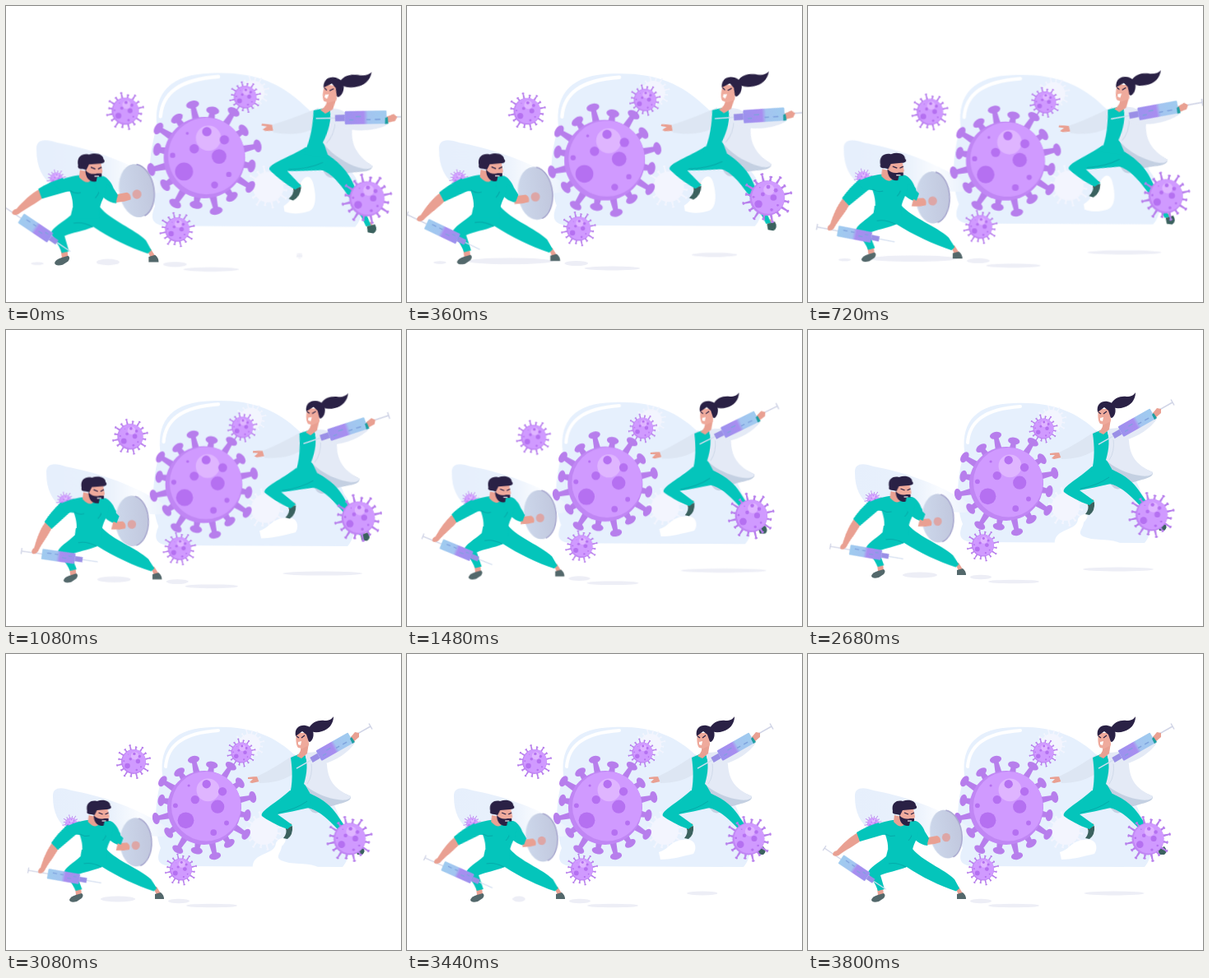
Write an HTML page that moves like this. It is 480 by 360 pixels and loops after 3840 ms.

```html
<!DOCTYPE html>
<html lang="en">
<head>
<meta charset="utf-8">
<title>Doctors fighting a virus</title>
<style>
html, body { margin: 0; width: 100%; height: 100%; overflow: hidden; background: #fff; }
svg { display: block; width: 480px; height: 360px; }

/* one-shot moves that restart with every loop */
.cam, .settle, .drift, .leap, .reach, .tail { animation: 3840ms infinite; }
.cam { animation-name: cam; transform-origin: 257px 163px; }
.settle { animation-name: settle; }
.drift { animation-name: drift; }
.leap { animation-name: leap; transform-origin: 343px 217px; }
.reach { animation-name: reach; transform-origin: 368px 127px; }
.tail { animation-name: tail; transform-origin: 370px 91px; }
@keyframes cam { 0% { transform: scale(1.1); animation-timing-function: cubic-bezier(.333,0,.667,1); } 49.5%, 100% { transform: none; } }
@keyframes settle { 0% { transform: translate(1.5px,-4.5px); animation-timing-function: ease-out; } 20%, 100% { transform: none; } }
@keyframes drift { 0% { transform: translate(9px,3px); animation-timing-function: cubic-bezier(.333,0,.667,1); } 49.5%, 100% { transform: none; } }
@keyframes leap { 0% { transform: translateY(5px) rotate(10.5deg) scale(1.03); animation-timing-function: cubic-bezier(.333,0,.667,1); } 49.5%, 100% { transform: none; } }
@keyframes reach { 0% { transform: rotate(18deg); animation-timing-function: cubic-bezier(.333,0,.667,1); } 49.5%, 100% { transform: none; } }
@keyframes tail { 0% { transform: rotate(-4deg) scaleX(1.1); animation-timing-function: cubic-bezier(.333,0,.667,1); } 49.5%, 100% { transform: none; } }

/* steady sway */
.body, .legs, .jab, .guard, .bob { animation: 960ms cubic-bezier(.364,0,.636,1) infinite alternate; }
.body { animation-name: body; }
.legs { animation-name: legs; transform-origin: 100px 292px; }
.jab { animation-name: jab; transform-origin: 80px 214px; }
.guard { animation-name: guard; transform-origin: 168px 219px; }
.bob { animation-name: bob; }
@keyframes body { to { transform: translateX(-5px); } }
@keyframes legs { to { transform: skewX(6deg); } }
@keyframes jab { to { transform: translate(-3px,5px) rotate(-27deg); } }
@keyframes guard { to { transform: translate(-6px,11px) rotate(8deg); } }
@keyframes bob { to { transform: translateX(5px); } }

/* parts that come and go */
.blink, .wipe, .early, .dip, .notch, .s1, .s2, .s3 { animation: 3840ms linear infinite; }
.blink, .early, .dip, .notch, .s3 { animation-timing-function: step-end; }
.blink { animation-name: blink; }
.wipe { animation-name: wipe; transform-origin: 154px 122px; }
.early, .s3 { animation-name: early; }
.dip { animation-name: dip; }
.notch { animation-name: notch; }
.s1 { animation-name: s1; transform-origin: 136px 298px; }
.s2 { animation-name: s2; transform-origin: 345px 291px; }
@keyframes blink { 0% { visibility: visible; } 58.5% { visibility: hidden; } 75% { visibility: visible; } 90.5%, 100% { visibility: hidden; } }
@keyframes wipe { 0%, 53% { transform: scale(0); } 58.5%, 74% { transform: scale(1); } 74.1%, 100% { transform: scale(0); } }
@keyframes early { 0% { visibility: visible; } 28%, 100% { visibility: hidden; } }
@keyframes dip { 0% { visibility: hidden; } 28% { visibility: visible; } 62% { visibility: hidden; } 86%, 100% { visibility: visible; } }
@keyframes notch { 0% { visibility: hidden; } 62% { visibility: visible; } 86%, 100% { visibility: hidden; } }
@keyframes s1 { 0% { transform: scaleX(.6); } 10%, 22% { transform: scaleX(2.4); } 32%, 44% { transform: scaleX(0); } 56% { transform: scaleX(.8); } 70%, 82% { transform: scaleX(1); } 94%, 100% { transform: scaleX(0); } }
@keyframes s2 { 0% { transform: scaleX(.08); } 16% { transform: scaleX(.95); } 38% { transform: scaleX(1.2); } 56%, 72% { transform: scaleX(1); } 78%, 84% { transform: scaleX(0); } 95%, 100% { transform: scaleX(.85); } }
</style>
</head>
<body>
<svg viewBox="0 0 480 360">
<defs>
  <linearGradient id="fluid"><stop offset="0" stop-color="#9fcbef"/><stop offset=".45" stop-color="#a3c4f0"/><stop offset=".55" stop-color="#a98df0"/><stop offset="1" stop-color="#9c92ee"/></linearGradient>
  <linearGradient id="glass"><stop offset="0" stop-color="#cbd6ea"/><stop offset="1" stop-color="#bfc5dc"/></linearGradient>
  <linearGradient id="mist"><stop offset="0" stop-color="#e6effc"/><stop offset=".5" stop-color="#e9f1fc"/><stop offset=".75" stop-color="#fafcff"/><stop offset="1" stop-color="#e9f1fc"/></linearGradient>
  <g id="syringe">
    <path d="M0 -3.500V3.500M0 0H25" stroke="#d0d4e6" stroke-width="1.3" fill="none"/>
    <path d="M72 0H90" stroke="#d3def0" stroke-width="1.2"/>
    <rect x="63" y="-3" width="9" height="6" fill="#9a8fe6"/>
    <rect x="24" y="-6.2" width="39" height="12.4" rx="1" fill="url(#fluid)"/>
    <path d="M30 -2h5M39 -2h4M48 1h5M55 -2h4" stroke="#7fa2dd" stroke-width="1.2"/>
  </g>
</defs>
<g class="cam">
  <!-- backdrop -->
  <path fill="#e6f0fd" d="M190 148C186 110 206 90 250 89C296 87 326 99 352 124C378 147 394 168 405 198C424 222 418 250 409 259L200 258C185 257 182 250 188 236C178 210 182 174 190 148Z"/>
  <path fill="none" stroke="#fff" stroke-width="4" stroke-linecap="round" d="M194 137C196 111 215 96 258 93"/>
  <g id="pale"></g>
  <path class="early" fill="#fff" d="M330 236C340 230 338 224 346 218C351 201 360 199 363 212C367 228 365 240 357 242C348 245 338 245 331 242Z"/>
  <path class="dip" fill="#fff" d="M306 241C318 238 320 227 336 226C351 223 353 237 348 243C335 246 322 250 308 250Z"/>
  <path class="notch" fill="#fff" d="M300 262C297 240 327 246 328 230C332 221 347 222 335 234C334 244 322 249 344 254C360 256 374 254 384 262Z"/>
  <path fill="url(#mist)" d="M57 174C56 162 66 161 80 166C112 172 152 184 190 207C201 214 198 222 188 222L78 216C63 206 57 192 57 174Z"/>
  <g fill="#edeef6">
    <ellipse cx="250" cy="306" rx="31" ry="2.3"/>
    <ellipse cx="210" cy="300.5" rx="13" ry="2.8"/>
    <ellipse class="s1" cx="136" cy="298" rx="21" ry="3.5"/>
    <ellipse class="s2" cx="377" cy="291" rx="43" ry="2.4"/>
    <ellipse class="s3" cx="58" cy="299.5" rx="7" ry="1.6"/>
  </g>
  <g id="tiny" opacity=".9"></g>
  <g class="settle" id="big"></g>
  <g id="small"></g>
  <g class="blink"><g id="upper"></g><circle class="wipe" cx="154" cy="122" r="30" fill="#fff"/></g>

  <!-- man -->
  <g fill="#e9a092">
    <path d="M84 285L91 284L92 293L85 293Z"/><path d="M179 284L183 283L188 291L183 293Z"/>
  </g>
  <g fill="#53686b">
    <path d="M77 299Q78 295 85 293L92 291Q95 293 92 297L86 301Q78 303 77 299Z"/>
    <path d="M181 292L188 290Q192 293 192 298L181 298Z"/>
  </g>
  <g class="legs">
    <path fill="#04c5bb" d="M97 238L127 237C139 252 165 261 178 274L184 285L180 288.500C160 282 138 271 120 259C108 264 97 265 88 269L93 286L85 288C82 278 75 271 73 266C74 260 86 254 95 246Z"/>
    <path fill="none" stroke="#06aaa9" d="M119 259Q108 253 98 255"/>
  </g>
  <g class="body">
    <g class="jab">
      <use href="#syringe" transform="translate(20 236) rotate(34)"/>
      <path fill="#e9a092" d="M61 217L64 227C57 233 46 238 37 245Q32 247 30 244Q30 240 35 239C42 231 51 222 61 217Z"/>
      <path fill="#04c5bb" d="M59 217C67 212 76 208 86 205L94 219L63 228Z"/>
    </g>
    <path fill="#04c5bb" d="M76 211C84 206 95 203 103 202L131 203C139 206 139 214 135 220C128 231 125 240 127 250L95 250C99 238 97 228 94 220L84 219Z"/>
    <path fill="none" stroke="#06aaa9" d="M94 219Q100 223 106 221M128 212Q127 222 122 227"/>
    <path fill="#e9a092" d="M105 196L114 198L118 206Q113 214 104 204Z"/>
    <path fill="#efaa9c" d="M111 189L128 188L130 198L127 204L112 204Z"/>
    <path fill="#2a2145" d="M103 191C101 182 107 177 115 179C123 176 131 179 131 184C134 187 131 189 127 189L115 190L112 196L108 195C104 195 102 194 103 191Z"/>
    <path fill="#2a2145" d="M111 196C115 201 120 201 124 200L129 200C130 205 126 209 121 209C115 209 111 204 111 196Z"/>
    <path fill="none" stroke="#2a2145" stroke-width="1.2" d="M117 193L122 195M125 195L129 193"/>
    <path stroke="#fff" stroke-width="1.1" d="M121 203H126"/>
    <path fill="#04c5bb" d="M124 204C134 202 139 208 142 216L149 227L145 233C136 232 128 226 122 214Z"/>
    <g class="guard">
      <g transform="rotate(-9 168 219)">
        <ellipse cx="167" cy="219" rx="19" ry="29.5" fill="#dbe4f1"/>
        <ellipse cx="168" cy="219" rx="19" ry="29.5" fill="url(#glass)" opacity=".93"/>
        <path d="M172 190.200A19 29.500 0 0 1 172 247.800" fill="none" stroke="#a9a9cf" stroke-width="1.5"/>
      </g>
      <path fill="#e9a092" d="M146 223L157 221Q162 223 161 229L154 231L145 232Z"/>
      <ellipse cx="168" cy="223" rx="5" ry="5.200" fill="#dda6a6"/>
    </g>
    <path fill="#04c5bb" d="M135 212L147 224L144 232L132 226Z"/>
  </g>

  <!-- woman -->
  <g class="leap">
    <path fill="#e9a092" d="M339 207L347 206L346 214L340 214ZM423 234L429 232L432 239L427 241Z"/>
    <g fill="#3b625f">
      <path d="M340 212L348 209Q349 220 342 225L337 224Q342 218 340 212Z"/>
      <path d="M425 238L433 234Q438 240 433 244L427 244Z"/>
    </g>
    <path fill="#c4d0e2" d="M362 155C380 158 400 164 419 173C420 181 405 181 390 187C378 196 372 196 366 184Z"/>
    <path fill="#04c5bb" d="M348 170L370 170C386 177 396 186 402 195L420 222L429 236L424 238C414 224 405 215 398 208C388 198 378 189 366 187Z"/>
    <path fill="#04c5bb" d="M345 166L372 171L368 187C354 190 341 193 330 195L348 208L342 213C330 209 316 201 311 197C308 191 330 180 345 166Z"/>
    <path fill="none" stroke="#06aaa9" d="M366 179Q352 189 331 193"/>
    <path fill="#e9a092" d="M308 149Q300 149 294 150L294 152L300 152L296 156L299 157L308 155Z"/>
    <path fill="#dde6f3" d="M351 122C340 129 322 141 305 149L308 157C324 157 341 153 351 144Z"/>
    <path fill="#04c5bb" d="M346 126L362 119C368 132 367 146 364 160L372 174L344 174C349 158 348 140 346 126Z"/>
    <path fill="#e4eaf6" d="M363 121C376 117 387 124 390 134C391 152 398 164 419 173C418 180 402 178 390 174C378 170 368 164 362 158C366 145 367 132 363 121Z"/>
    <path fill="none" stroke="#d0daea" d="M371 132Q373 148 366 158"/>
    <path fill="#e9a092" d="M358 110L368 108L366 121L359 127L353 124Q360 119 358 110Z"/>
    <path fill="#efaa9c" d="M353 96L367 96L368 111L360 115L355 114C352 110 352 104 353 96Z"/>
    <path fill="#2a2145" d="M352 100C350 90 357 86 364 87C372 88 375 95 373 102C371 107 368 109 367 104L365 98L360 94Z"/>
    <path class="tail" fill="#2a2145" d="M368 91C371 82 381 80 387 81C393 81 396 79 398 76C398 85 392 92 384 94C378 96 371 96 368 91Z"/>
    <path fill="none" stroke="#2a2145" stroke-width="1.1" d="M353 100L356 102M359 102L363 99"/>
    <path fill="#fff" d="M355 107L359 106L358 111L355 110Z"/>
    <g class="reach">
      <path fill="#e4eaf6" d="M366 121C376 117 389 122 400 114L419 101L424 108C417 119 401 130 385 134C376 137 368 134 366 127Z"/>
      <use href="#syringe" transform="translate(443 88) rotate(150.4) scale(1.15)"/>
      <path fill="#e9a092" d="M419 101L424 95L429 96L429 101L422 107Z"/>
      <path fill="#1f9fa2" d="M418 103L420 101L424 107L421 109Z"/>
    </g>
  </g>
  <g class="drift"><g class="bob" id="right"></g></g>
</g>
</svg>
<script>
const dot = (x, y, r, fill) => `<circle cx="${x}" cy="${y}" r="${r}" fill="${fill}"/>`;
const put = (id, html) => { document.getElementById(id).innerHTML += html; };

// x, y, radius as fractions of the body radius
const spots = [[-.5, .34, .22], [.36, -.03, .18], [.49, -.44, .115], [-.25, -.22, .115],
  [.25, .67, .085], [.6, .41, .065], [-.78, -.06, .065], [.06, -.64, .115], [-.42, -.6, .035]];

// sixteen spikes, long and short in turn
function spikes(r, len, fill) {
  const large = r > 30, w = r * (large ? .05 : .04), cap = r * (large ? .16 : .095);
  let out = '';
  for (let i = 0; i < 16; i++) {
    const tip = r + len * (i % 2 ? .6 : 1);
    out += `<g transform="rotate(${-102.5 + i * 22.5})" fill="${fill}">` +
      `<path d="M${r * .94} ${-w * 1.8}L${tip} ${-w}V${w}L${r * .94} ${w * 1.8}Z"/>` +
      `<ellipse cx="${tip - cap * .4}" rx="${cap * .6}" ry="${cap}"/></g>`;
  }
  return out;
}

function virus(id, x, y, r, len) {
  const body = spikes(r, len, '#b77eec') + dot(0, 0, r, '#c086f4') +
    dot(r * .05, -r * .04, r * .94, '#d09aff') + dot(r * .1, -r * .48, r * .31, '#dfb5ff') +
    spots.map(([a, b, c]) => dot(a * r, b * r, c * r, '#b570f1')).join('');
  put(id, `<g transform="translate(${x} ${y})">${body}</g>`);
}

function ghost(x, y, r) {
  put('pale', `<g transform="translate(${x} ${y})">${spikes(r, r * .4, '#f3f5fe') + dot(0, 0, r, '#f3f5fe')}</g>`);
}

ghost(296, 110, 13);
ghost(313, 215, 17);
virus('tiny', 79, 206, 7, 3.5);
virus('big', 241, 187, 45, 18);
virus('big', 286, 120, 12.5, 5);
virus('small', 212.5, 262, 13.5, 6);
virus('upper', 155, 131, 15, 6);
virus('right', 413, 225, 19.5, 8.5);
</script>
</body>
</html>
```
